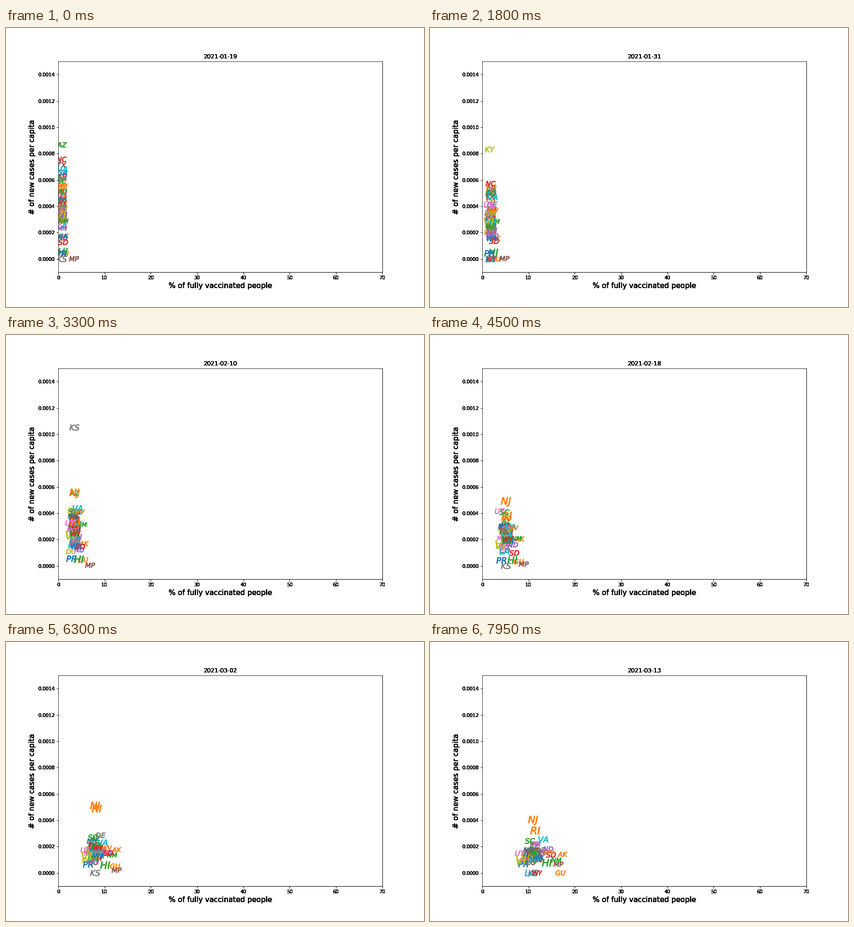
A matplotlib script for the animation above (8000 ms loop, 864 by 576 pixels).

```python
import numpy as np
import matplotlib.pyplot as plt
from matplotlib.animation import FuncAnimation
from matplotlib.markers import MarkerStyle

STEP_MS, LOOP_MS, TICK_MS = 150, 8000, 50
START = np.datetime64("2021-01-19")
DAYS = np.arange(54)
STATES = ("AL AK AZ AR CA CO CT DE DC FL GA GU HI ID IL IN IA KS KY LA ME MD "
          "MA MI MN MS MO MT NE NV NH NJ NM NC ND MP OH OK OR PA PR RI SC SD "
          "TN TX UT VT VI VA WA WV WI WY").split()
COUNT = len(STATES)

rng = np.random.default_rng(7)


def rows(names):
    return [STATES.index(name) for name in names.split()]


def spread(values, names, centre, width):
    """Give the named states falling values around a centre."""
    members = rows(names)
    values[members] = centre * np.linspace(1 + width, 1 - width, len(members))


# Share of fully vaccinated people, in percent: an accelerating rise
final = rng.normal(11.4, 0.9, COUNT)
spread(final, "AK GU MP NM", 16.7, 0.04)
spread(final, "SD WV ND HI", 14.4, 0.03)
spread(final, "PR DC VI UT", 8.5, 0.04)
first = 0.07 * final
first[rows("MP")] = 3.4
rise = (DAYS / DAYS[-1]) ** 1.5
shares = first[:, None] + (final - first)[:, None] * rise

# New cases per 100,000: an exponential decline with daily noise
before = rng.uniform(25, 52, COUNT)
after = rng.uniform(6, 18, COUNT)
for names, begin, end in [
        ("AZ KY OK NC TX GA AR", 77, 14),
        ("SC VA WV DE FL", 56, 19),
        ("NJ RI", 52, 37),
        ("MN AK ND WA SD", 16, 16),
        ("HI PR GU", 4.5, 6),
        ("KS", 95, 35),
        ("MP", 0.1, 6)]:
    spread(before, names, begin, 0.15)
    spread(after, names, end, 0.15)
trend = before[:, None] * (after / before)[:, None] ** (DAYS / DAYS[-1])
cases = trend * np.exp(rng.normal(0, 0.15, trend.shape))

# Days without reports (Monday is 0)
weekday = (DAYS + 1) % 7
cases[np.ix_(rows("KS"), ~np.isin(weekday, [0, 2, 4]))] = 0
cases[np.ix_(rows("CT LA WY GU"), weekday >= 5)] = 0


def draw_repeatedly(artist, times=12):
    """Overprint an artist so that its soft edges turn solid."""
    draw_once = artist.draw

    def draw(renderer):
        for _ in range(times):
            draw_once(renderer)

    artist.draw = draw


def label_path(state):
    marker = MarkerStyle(f"${state}$")
    return marker.get_path().transformed(marker.get_transform())


plt.rcParams["font.family"] = "DejaVu Sans"
fig, ax = plt.subplots(figsize=(12, 8), dpi=72)
fig.subplots_adjust(bottom=0.125)
labels = ax.scatter(shares[:, 0], cases[:, 0], s=400, linewidths=1,
                    c=[f"C{i % 10}" for i in range(COUNT)])
labels.set_paths([label_path(state) for state in STATES])

ax.set(xlim=(0, 70), ylim=(-0.0001, 0.0015),
       xticks=range(0, 71, 10), yticks=np.arange(8) * 0.0002)
ax.set_xlabel("% of fully vaccinated people", fontsize=15)
ax.set_ylabel("# of new cases per capita", fontsize=15)
title = ax.set_title(str(START), fontsize=12)

# Everything outside the white plot area has hard edges
outside = [title, ax.spines["right"], ax.spines["bottom"]]
for axis in (ax.xaxis, ax.yaxis):
    outside += [axis.label, *axis.get_major_ticks()]
for artist in outside:
    draw_repeatedly(artist)


def update(frame):
    day = frame * TICK_MS // STEP_MS
    labels.set_offsets(np.column_stack([shares[:, day], cases[:, day] * 1e-5]))
    title.set_text(str(START + day))
    return labels, title


anim = FuncAnimation(fig, update, frames=LOOP_MS // TICK_MS, interval=TICK_MS,
                     repeat=True, repeat_delay=0)
plt.show()
```
